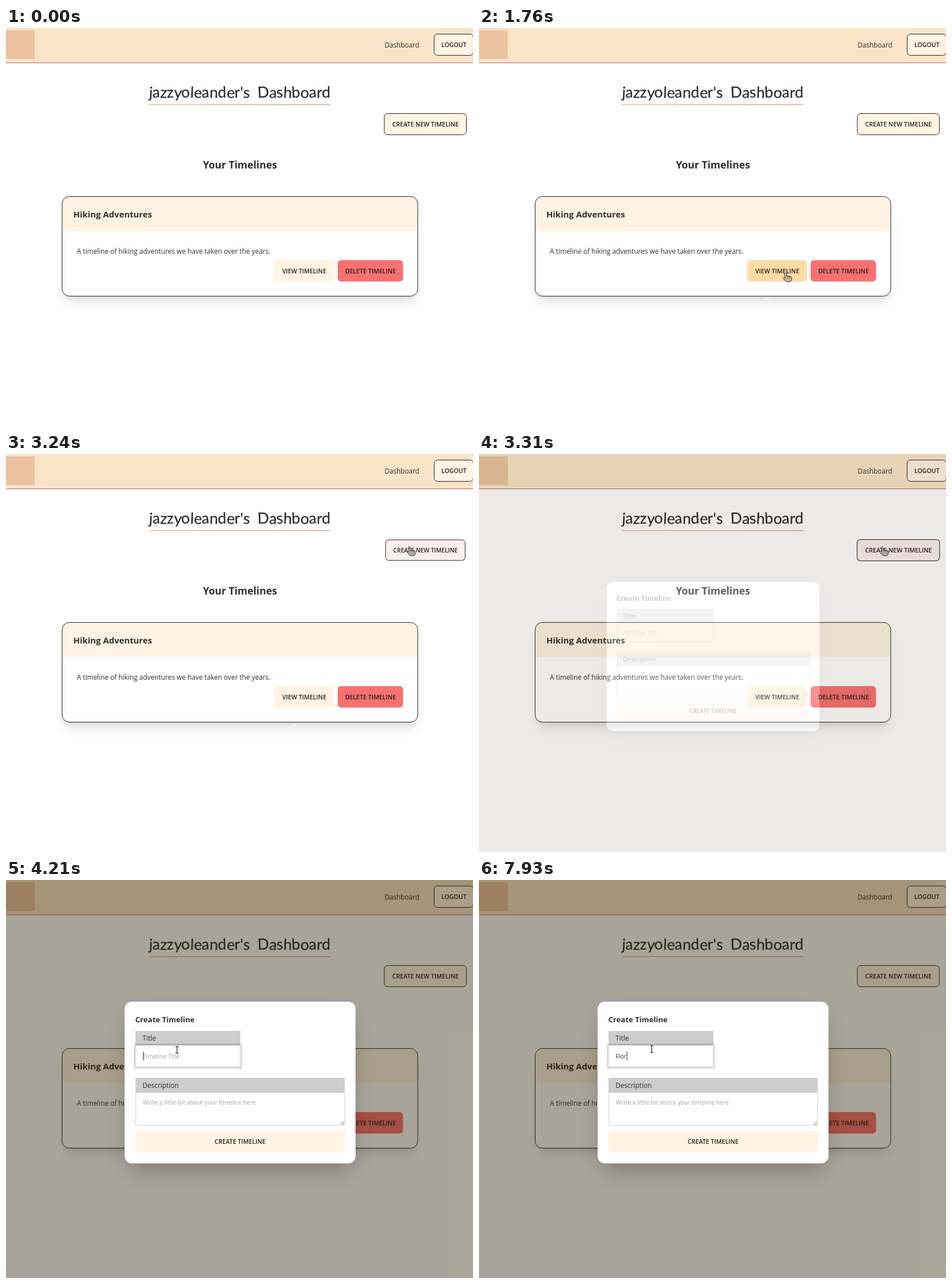
Recreate the animation shown at these times as an HTML page. Size 811x691 px, loop 8 s.

```html
<!DOCTYPE html>
<html lang="en">
<head>
<meta charset="utf-8">
<title>Timeline dashboard</title>
<style>
  html, body { margin: 0; width: 100%; height: 100%; overflow: hidden; background: #fff; }
  svg { display: block; width: 811px; height: 691px; }
  text { font-family: "Open Sans", "Noto Sans", sans-serif; font-size: 11.8px; fill: #2f2f2f; white-space: pre; }
  .bold { font-weight: 700; }
  .btn { font-size: 10.6px; font-weight: 600; fill: #291f1c; text-anchor: middle; }
  .hand { font-family: Lato, sans-serif; font-size: 26.5px; fill: #292929; stroke: #292929; stroke-width: .2; }
  .field { font-size: 10.4px; }
  .hint { fill: #9ca3af; }
  .line { fill: #fff; stroke: #d0d0d0; }
  .edge { stroke: #291f1c; }
</style>
</head>
<body>
<svg viewBox="0 0 811 691" xmlns="http://www.w3.org/2000/svg">
  <defs>
    <linearGradient id="rule"><stop stop-color="#f3bd80"/><stop offset="1" stop-color="#e79a9a"/></linearGradient>
    <filter id="soft" x="-20%" y="-40%" width="140%" height="180%"><feGaussianBlur stdDeviation="9.75"/></filter>
    <filter id="near" x="-20%" y="-40%" width="140%" height="180%"><feGaussianBlur stdDeviation="4"/></filter>
    <filter id="wide" x="-30%" y="-40%" width="160%" height="180%"><feGaussianBlur stdDeviation="19.5"/></filter>
  </defs>
  <rect width="811" height="691" fill="#fff"/>

  <rect width="811" height="60" fill="#fae4c8"/>
  <rect y="60" width="811" height="1" fill="#b4686a"/>
  <rect y="4" width="50" height="50" fill="#ebc3a0"/>
  <text x="657.5" y="34" style="font-size:11.7px">Dashboard</text>
  <rect class="edge" x="743.5" y="10.5" width="68" height="37" rx="6" fill="#fff4e4"/>
  <text class="btn" x="777.8" y="33">LOGOUT</text>

  <text class="hand" y="121"><tspan x="248" rotate="3 -3 2 -2 3 -4 2 3 -3 2 -2 3 -2 0 3">jazzyoleander's</tspan><tspan x="437" rotate="-2 3 -3 2 -2 3 -3 2 0">Dashboard</tspan></text>
  <rect x="248" y="132.3" width="315" height="1.5" fill="url(#rule)"/>

  <g id="create">
    <rect id="createBg" class="edge" x="657" y="148.5" width="142.5" height="36.8" rx="6"/>
    <text class="btn" x="728.5" y="171">CREATE NEW TIMELINE</text>
  </g>

  <text class="bold" x="406.3" y="243.5" text-anchor="middle" style="font-size:17.45px">Your Timelines</text>

  <rect x="101" y="312" width="610" height="165" rx="10" opacity=".1" filter="url(#soft)"/>
  <rect x="102" y="303" width="608" height="164" rx="10" opacity=".1" filter="url(#near)"/>
  <rect x="97.5" y="292.5" width="617.5" height="173" rx="12.5" fill="#fff"/>
  <path d="M97.5 352V305a12.5 12.5 0 0 1 12.5-12.5H702.5a12.5 12.5 0 0 1 12.5 12.5V352Z" fill="#fff4e3"/>
  <rect x="97.5" y="292.5" width="617.5" height="173" rx="12.5" fill="none" stroke="#252525"/>
  <text class="bold" x="117" y="329" style="font-size:14.8px">Hiking Adventures</text>
  <text x="123" y="391.5">A timeline of hiking adventures we have taken over the years.</text>
  <rect id="viewBg" x="465.5" y="403" width="104" height="37.3" rx="6"/>
  <text class="btn" x="518" y="425.5">VIEW TIMELINE</text>
  <rect x="576" y="403" width="113.5" height="37.3" rx="6" fill="#f87171"/>
  <text class="btn" x="633" y="425.5">DELETE TIMELINE</text>
  <rect id="fleck" x="494" y="469.5" width="10" height="2.5" fill="#fbf6d3"/>

  <g id="modal">
    <rect width="811" height="691" fill="#281d00" fill-opacity=".4"/>
    <g id="box">
      <rect x="215" y="239.5" width="383" height="263" rx="12" opacity=".25" filter="url(#wide)"/>
      <rect x="206" y="211.3" width="401" height="280.7" rx="12.5" fill="#fff"/>
      <text class="bold" x="224.5" y="246.5" style="font-size:13.1px">Create Timeline</text>

      <rect x="224.8" y="262" width="182.2" height="25" fill="#cdcdcd"/>
      <text x="237" y="279">Title</text>
      <rect class="line" x="225.3" y="287.3" width="181.2" height="37"/>
      <rect id="focus" x="223.3" y="285.3" width="185.4" height="41" fill="none" stroke="#000" stroke-opacity=".22" stroke-width="1.6"/>
      <text id="titleHint" class="field hint" x="237.6" y="310">Timeline Title</text>
      <text id="typed" class="field" x="237.6" y="310"></text>
      <rect id="caret" y="298" width="1" height="15" fill="#222"/>

      <rect x="224.8" y="343.5" width="363.5" height="25.5" fill="#cdcdcd"/>
      <text x="237" y="360.5">Description</text>
      <rect class="line" x="225.3" y="369" width="362.7" height="57"/>
      <text class="field hint" x="237.6" y="390.3">Write a little bit about your timeline here</text>
      <path d="M580.5 425L587 418.5M584 425L587 422" stroke="#555" stroke-width=".9"/>

      <rect x="224.8" y="435.3" width="363.5" height="37.5" rx="6" fill="#fff4e3"/>
      <text class="btn" x="406.5" y="458.3">CREATE TIMELINE</text>
    </g>
  </g>

  <g id="pointer">
    <path id="arrow" d="M0 0V13L3 10.3L5.2 15.2L7.4 14.2L5.3 9.5H9.5Z" fill="#fff" stroke="#222" stroke-width=".9"/>
    <g id="finger" stroke="#3c3a36" stroke-width="1" stroke-linejoin="round" stroke-linecap="round">
      <path d="M-1.5 .8Q-.4 -1 1.2 .6L3 6Q9 5 10.8 8V12.5Q10 16 6.5 16Q1.5 16 -.8 13L-3.6 9.6Q-3.8 7.6 -.6 8.6Z"/>
      <path d="M3 6L3.6 8.6M5.8 5.8L6.2 8.6M8.3 6.3L8.6 8.8" fill="none" stroke-width=".7"/>
    </g>
    <path id="beam" d="M-2.5 -6Q0 -6 0 -4.6Q0 -6 2.5 -6M0 -5V5M-2.5 6Q0 6 0 4.6Q0 6 2.5 6" fill="none" stroke="#333" stroke-width="1.3"/>
  </g>
</svg>
<script>
const LOOP = 8000;
const $ = id => document.getElementById(id);
const clamp = v => Math.max(0, Math.min(1, v));
const ramp = (t, from, len) => clamp((t - from) / len);
const mix = (a, b, k) => a + (b - a) * k;
const show = (id, on) => $(id).setAttribute("display", on ? "inline" : "none");
const blend = (a, b, k) => `rgb(${a.map((v, i) => Math.round(mix(v, b[i], k)))})`;
const between = (t, from, to) => t >= from && t < to;

// Pointer stops: time, x, y
const stops = [
  [250, 697, 632], [590, 540, 544], [850, 540, 544], [1010, 549, 553],
  [1620, 478, 458], [1690, 500, 456], [1760, 532, 425], [1820, 532, 425],
  [2450, 700, 161], [3430, 700, 161], [3810, 297, 295], [4570, 297, 295], [4650, 300, 293.5]
];
const keys = [[7460, "F"], [7660, "Fl"], [7860, "Flo"], [7930, "Flor"]];
const CREAM = [255, 244, 228], AMBER = [255, 219, 166], BLUSH = [251, 239, 238];

function pointerAt(t) {
  let i = 0;
  while (i < stops.length - 1 && t >= stops[i + 1][0]) i++;
  const a = stops[i], b = stops[i + 1] || a;
  const u = b === a ? 0 : ramp(t, a[0], b[0] - a[0]);
  const k = u * u * (3 - 2 * u);
  return [mix(a[1], b[1], k), mix(a[2], b[2], k)];
}

// cubic-bezier(.4, 0, .2, 1)
function ease(x) {
  let lo = 0, hi = 1;
  for (let i = 0; i < 24; i++) {
    const s = (lo + hi) / 2, r = 1 - s;
    if (1.2 * s * r * r + .6 * s * s * r + s * s * s < x) lo = s; else hi = s;
  }
  return lo * lo * (3 - 2 * lo);
}

function scaleAbout(id, x, y, s) {
  $(id).setAttribute("transform", `translate(${x} ${y}) scale(${s}) translate(${-x} ${-y})`);
}

function buttonScale(t) {
  if (t < 3245) return mix(1, .97, ramp(t, 3040, 70));
  const u = ramp(t, 3245, 250);
  return u < .4 ? mix(.98, 1.02, u / .4) : mix(1.02, 1, (u - .4) / .6);
}

function caretOn(t) {
  if (t < 4130) return false;
  if (t >= 7260) return true;
  return Math.floor((t - 4140) / 530 + .02) % 2 === 0;
}

function draw(t) {
  const [x, y] = pointerAt(t);
  const overView = between(t, 1690, 1900), overCreate = between(t, 2320, 3480);
  const inField = t >= 3800;
  show("pointer", t >= 250);
  $("pointer").setAttribute("transform", `translate(${x} ${y})`);
  show("finger", overView || overCreate);
  show("beam", inField);
  show("arrow", !overView && !overCreate && !inField);
  $("finger").setAttribute("fill", t < 2000 ? "#c4b691" : t < 3350 ? "#b0a7a1" : "#d2cac4");

  const view = ramp(t, 1685, 70) - ramp(t, 1890, 150);
  const create = ramp(t, 2310, 140) - ramp(t, 3470, 150);
  $("viewBg").setAttribute("fill", blend(CREAM, AMBER, view));
  $("createBg").setAttribute("fill", blend(CREAM, BLUSH, create));
  scaleAbout("create", 728.3, 167, buttonScale(t));
  show("fleck", between(t, 1690, 3300));

  const open = ease(ramp(t, 3259, 207));
  show("modal", t > 3259);
  $("modal").setAttribute("opacity", open);
  scaleAbout("box", 406.5, 351.6, mix(.9, 1, open));

  let word = "";
  for (const [at, text] of keys) if (t >= at) word = text;
  const typed = $("typed");
  if (typed.textContent !== word) typed.textContent = word;
  show("titleHint", !word);
  show("focus", t >= 4130);
  show("caret", caretOn(t));
  $("caret").setAttribute("x", 238 + (word ? typed.getComputedTextLength() : 0));
}

let start = null;
function tick(now) {
  if (start === null) start = now;
  draw((now - start) % LOOP);
  requestAnimationFrame(tick);
}
draw(0);
requestAnimationFrame(tick);
</script>
</body>
</html>
```
